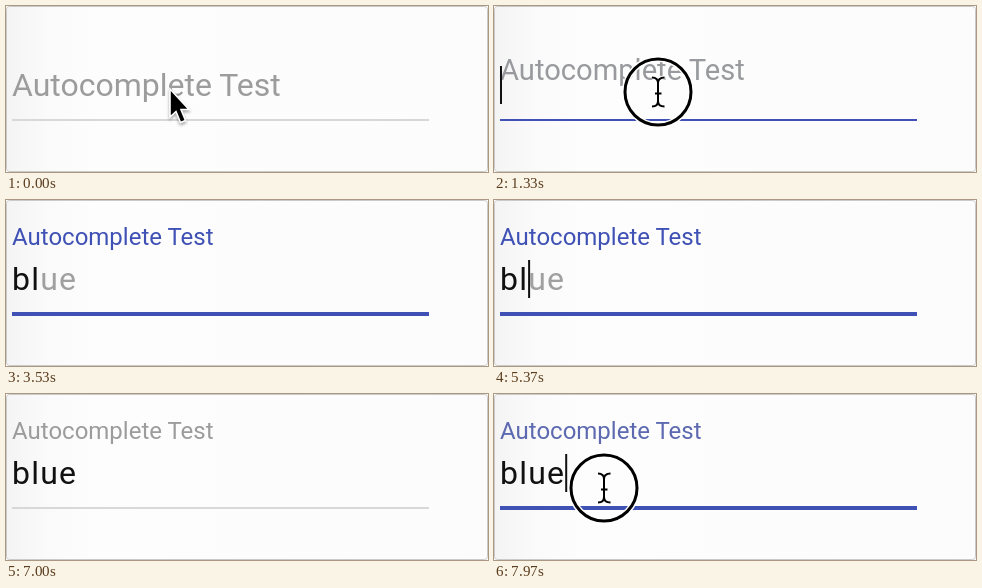
An HTML page that plays this animation: 482x166 px, repeating every 8000 ms.

```html
<!DOCTYPE html>
<html lang="en">
<head>
<meta charset="utf-8">
<title>Autocomplete field</title>
<style>
  :root { --indigo: #3f51b5; --grey: #9c9c9c; --ghost: #a0a0a0; --ink: #111; }
  html, body { margin: 0; width: 100%; height: 100%; overflow: hidden; background: #fff; }
  svg { display: block; width: 482px; height: 166px; font-family: Roboto, Arial, sans-serif; }

  /* one shared 8 s clock: 1% = 80 ms */
  .a { animation: 8s linear -5ms infinite; }
  .step { animation-timing-function: step-end; }

  .label { font-size: 32px; animation-name: float, tint; }
  @keyframes float {
    0% { transform: translate(6px, 90px); }
    16.15% { transform: translate(6px, 90px); animation-timing-function: cubic-bezier(.25, .8, .25, 1); }
    21.15%, 22.125% { transform: translate(6px, 44.4px) scale(.75); }
    25%, 100% { transform: translate(6px, 45px) scale(.75); }
  }
  @keyframes tint {
    0% { fill: var(--grey); }
    16.25% { fill: var(--grey); animation-timing-function: ease-in-out; }
    20%, 74.625% { fill: var(--indigo); }
    79.125%, 97.5% { fill: var(--grey); }
    99.6%, 100% { fill: #5d69b0; }
  }

  .bar { fill: var(--indigo); transform-origin: 0 114px; animation-name: bar; }
  @keyframes bar {
    0%, 15.875% { opacity: 0; transform: scaleY(1); }
    16.375%, 16.8% { opacity: 1; transform: scaleY(1); }
    18.5%, 74.625% { opacity: 1; transform: scaleY(2); }
    77.5% { opacity: 1; transform: scaleY(1); }
    79.125%, 97.75% { opacity: 0; transform: scaleY(1); }
    98.125% { opacity: 1; transform: scaleY(1); }
    99.25%, 100% { opacity: 1; transform: scaleY(2); }
  }

  .value { font-size: 32px; letter-spacing: 1.2px; }
  .b { animation-name: b; }
  .l { animation-name: l; }
  .u { animation-name: u; }
  .e { animation-name: e; }
  @keyframes b {
    0% { fill: transparent; }
    32.875%, 100% { fill: var(--ink); }
  }
  @keyframes l {
    0% { fill: transparent; }
    34.125% { fill: var(--ghost); }
    36.625%, 100% { fill: var(--ink); }
  }
  @keyframes u {
    0% { fill: transparent; }
    34.125%, 67.125% { fill: var(--ghost); }
    54.625%, 74.625%, 100% { fill: var(--ink); }
  }
  @keyframes e {
    0% { fill: transparent; }
    34.125%, 63.375% { fill: var(--ghost); }
    56.625%, 74.625%, 100% { fill: var(--ink); }
  }

  .caret { animation-name: blink, caret; }
  @keyframes blink {
    0%, 23.375%, 44.125%, 74.625% { opacity: 0; }
    16.125%, 30.375%, 50.875%, 98%, 100% { opacity: 1; }
  }
  @keyframes caret {
    0% { transform: translateX(6px); }
    32.875% { transform: translateX(25.2px); }
    36.625%, 67.125% { transform: translateX(34.1px); }
    54.625%, 63.375% { transform: translateX(53px); }
    56.625%, 74.625%, 100% { transform: translateX(71.2px); }
  }

  .pointer { animation-name: move, show; }
  @keyframes move {
    0%, 25% { transform: translate(164px, 86px); }
    25.01% { transform: translate(146px, 176px); }
    92% { transform: translate(146px, 176px); animation-timing-function: ease-out; }
    95%, 100% { transform: translate(110px, 94px); }
  }
  @keyframes show {
    0%, 17.5% { opacity: 1; }
    19.5%, 92% { opacity: 0; }
    92.125%, 100% { opacity: 1; }
  }
  .arrow { animation-name: arrow; filter: drop-shadow(0 2px 1.5px rgba(0, 0, 0, .35)); }
  @keyframes arrow {
    0%, 50% { opacity: 1; }
    6.25%, 93.25%, 100% { opacity: 0; }
  }
  .beam { animation-name: beam; }
  @keyframes beam {
    0%, 50% { opacity: 0; }
    6.25%, 93.25%, 100% { opacity: 1; }
  }
  .ring { animation-name: ring; }
  .ring circle { animation-name: shrink; }
  @keyframes ring {
    0%, 9.6% { opacity: 0; }
    9.625% { opacity: .35; }
    11.25%, 25% { opacity: 1; }
    25.01%, 94.6% { opacity: 0; }
    94.625% { opacity: .35; }
    96.25%, 100% { opacity: 1; }
  }
  @keyframes shrink {
    0%, 9.625% { r: 43.5px; }
    11.25%, 50% { r: 33px; }
    50.01%, 94.625% { r: 43.5px; }
    96.25%, 100% { r: 33px; }
  }
  .halo { fill: none; stroke: #fff; }
  .dark { fill: none; stroke: #000; }
</style>
</head>
<body>
<svg viewBox="0 0 482 166">
  <defs>
    <linearGradient id="shade">
      <stop offset="0" stop-color="#f4f4f4"/>
      <stop offset=".08" stop-color="#fafafa"/>
      <stop offset=".18" stop-color="#fdfdfd"/>
      <stop offset="1" stop-color="#fcfcfc"/>
    </linearGradient>
    <path id="ibeam" d="M-6 -14.5Q0 -14.5 0 -9V9Q0 14.5 -6 14.5M6.5 -14.5Q0 -14.5 0 -9M0 9Q0 14.5 6.5 14.5M-3 1.5H3.5"/>
  </defs>
  <rect x=".5" y=".5" width="481" height="165" rx="3" fill="url(#shade)" stroke="#cacaca"/>
  <rect x="6" y="113" width="417" height="2" fill="#d8d8d8"/>
  <rect class="a bar" x="6" y="113" width="417" height="2"/>

  <text class="a label">Autocomplete Test</text>
  <text class="value" x="6" y="90"><tspan class="a step b">b</tspan><tspan class="a step l">l</tspan><tspan class="a step u">u</tspan><tspan class="a step e">e</tspan></text>
  <rect class="a step caret" y="60" width="2" height="38" fill="#111"/>

  <g class="a pointer">
    <g class="a ring">
      <circle class="a halo" r="33" stroke-width="6"/>
      <circle class="a dark" r="33" stroke-width="3"/>
    </g>
    <path class="a step arrow" d="M0 -3V25L6 19.5L10.5 30.5L15.5 28.5L11 17.5H19Z" fill="#000" stroke="#fff" stroke-width="1.6"/>
    <g class="a step beam">
      <use href="#ibeam" class="halo" stroke-width="4"/>
      <use href="#ibeam" class="dark" stroke-width="2"/>
    </g>
  </g>
</svg>
</body>
</html>
```
